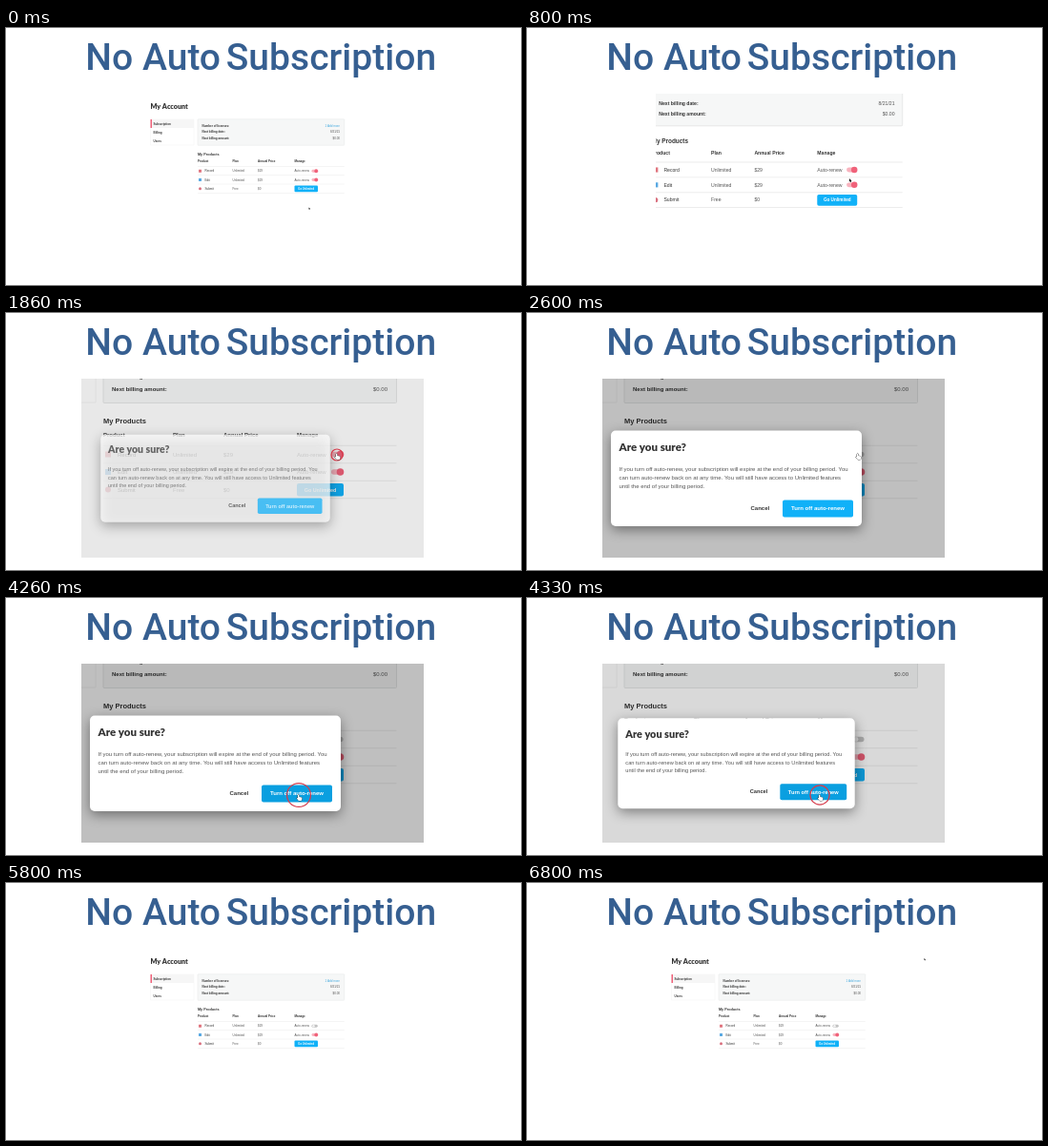
An HTML page with a canvas for the animation above (6860 ms loop, 540 px wide and 270 px high).

```html
<!DOCTYPE html>
<html lang="en">
<head>
<meta charset="utf-8">
<title>No Auto Subscription</title>
<style>
html, body { margin: 0; width: 540px; height: 270px; overflow: hidden; background: #fff; }
canvas { display: block; }
</style>
</head>
<body>
<canvas width="540" height="270"></canvas>
<script>
const LOOP = 6860;
const ctx = document.querySelector('canvas').getContext('2d');
const SANS = '"Liberation Sans", Arial, sans-serif';
const BLUE = '#10b1f8', PINK = '#f0627a', DARK = '#333', GRAY = '#555';
const ZOOM_X = 300, ZOOM_Y = 152;
const TITLE = [['No', 83.3], ['Auto', 143], ['Subscription', 230.8]];

// time, x, y of the pointer tip, in page units (the page at full zoom)
const PATH = [
  [0, 335, 225], [200, 335, 225], [1000, 346, 147], [2900, 346, 147],
  [3450, 306, 206], [4440, 306, 206], [5900, 376, 204], [6600, 508, 60], [6790, 533, 6]
];
const CLICKS = [[1640, 347, 149], [4230, 307, 207]];

const ramp = (t, a, b) => Math.min(1, Math.max(0, (t - a) / (b - a)));
const smooth = (t, a, b) => { const u = ramp(t, a, b); return u * u * (3 - 2 * u); };

function text(str, x, y, { size = 6, weight = 400, color = GRAY, align = 'left', font = SANS } = {}) {
  ctx.font = `${weight} ${size}px ${font}`;
  ctx.fillStyle = color;
  ctx.textAlign = align;
  ctx.fillText(str, x, y);
}
const bold = (str, x, y, opts) => text(str, x, y, { weight: 700, color: DARK, ...opts });

function box(x, y, w, h, fill, r = 0, stroke) {
  ctx.beginPath();
  ctx.roundRect(x, y, w, h, r);
  ctx.fillStyle = fill;
  ctx.fill();
  if (stroke) {
    ctx.strokeStyle = stroke;
    ctx.lineWidth = 1;
    ctx.stroke();
  }
}

function disc(x, y, r, fill) {
  ctx.beginPath();
  ctx.arc(x, y, r, 0, 7);
  ctx.fillStyle = fill;
  ctx.fill();
}

function toggle(y, on) {
  box(341, y - 2.8, 12.5, 5.6, on ? '#f8b3be' : '#c2c2c2', 2.8);
  disc(on ? 350.5 : 345, y, on ? 3.8 : 2.4, on ? PINK : '#f6f6f6');
}

function sidebar() {
  box(3, 40, 91, 54, '#fff', 0, '#f2f2f2');
  box(3, 40, 91, 18, '#f6f6f6');
  box(3, 40, 3, 18, PINK);
  ['Subscription', 'Billing', 'Users'].forEach((s, i) => bold(s, 9, 51 + 18 * i));
}

function summary() {
  box(102, 39.5, 307.5, 55, '#f6f7f7', 1, '#e4e6e6');
  const rows = [['Number of licenses:', '1 Add more'], ['Next billing date:', '8/21/21'], ['Next billing amount:', '$0.00']];
  rows.forEach(([label, value], i) => {
    const y = 55.4 + 13.4 * i;
    bold(label, 111, y);
    text(value, 400, y, { align: 'right', color: i ? GRAY : '#3ba6dd' });
  });
}

function products(t) {
  bold('My Products', 102, 116, { size: 7.5 });
  const cols = [102, 175, 228, 305];
  ['Product', 'Plan', 'Annual Price', 'Manage'].forEach((s, i) => bold(s, cols[i], 130.2));
  for (let i = 0; i < 4; i++) box(102, 138.7 + 18.5 * i, 307.5, 1, '#ececec');

  const rows = [['Record', 'Unlimited', '$29'], ['Edit', 'Unlimited', '$29'], ['Submit', 'Free', '$0']];
  rows.forEach(([name, plan, price], i) => {
    const y = 148.5 + 18.5 * i;
    if (i < 2) box(104, y - 3, 6, 6, i ? '#5aa9e2' : '#e0757f');
    else disc(107, y, 3, '#d9707f');
    text(name, 117, y + 2, { color: DARK });
    text(plan, cols[1], y + 2);
    text(price, cols[2], y + 2);
    if (i < 2) {
      text('Auto-renew', cols[3], y + 2);
      toggle(y, i === 1 || t < 2000);
    }
  });
  box(305, 179, 49, 13.5, BLUE, 2);
  bold('Go Unlimited', 329.5, 187.6, { size: 5.4, color: '#fff', align: 'center' });
}

function dialog(t, m) {
  box(79, 69, 359, 188, `rgba(0,0,0,${0.25 * m})`);
  const k = 0.865 + 0.135 * m;
  ctx.save();
  ctx.translate(219.5, 173.5);
  ctx.scale(k, k);
  ctx.translate(-219.5, -173.5);
  ctx.globalAlpha = Math.min(1, 2 * m);
  ctx.shadowColor = 'rgba(0,0,0,.42)';
  ctx.shadowBlur = 13;
  ctx.shadowOffsetY = 4;
  box(88, 123.5, 263, 100.5, '#fff', 5);
  ctx.shadowColor = 'transparent';
  bold('Are you sure?', 96.5, 145, { size: 11.5, weight: 900, font: 'Lato, sans-serif' });
  [
    'If you turn off auto-renew, your subscription will expire at the end of your billing period. You',
    'can turn auto-renew back on at any time. You will still have access to Unlimited features',
    'until the end of your billing period.'
  ].forEach((line, i) => text(line, 96.5, 165.6 + 9.2 * i));
  bold('Cancel', 234.5, 207.2);
  box(268, 196.5, 74, 18, t > 3330 && t < 4400 ? '#0a9fe0' : BLUE, 2);
  bold('Turn off auto-renew', 305, 207.4, { color: '#fff', align: 'center' });
  ctx.restore();
}

function rings(t) {
  for (const [start, x, y] of CLICKS) {
    const age = t - start;
    if (age < 0 || age > 260) continue;
    ctx.beginPath();
    ctx.arc(x, y, 13.5 - 0.034 * age, 0, 7);
    ctx.strokeStyle = '#d63c4c';
    ctx.lineWidth = 1.2;
    ctx.stroke();
  }
}

function pointer(t) {
  if (t > 4440 && t < 5900) return;
  let i = PATH.length - 1;
  while (PATH[i][0] > t) i--;
  const a = PATH[i], b = PATH[i + 1] || a;
  const u = a === b ? 0 : smooth(t, a[0], b[0]);
  const hand = (t > 950 && t < 3000) || (t > 3330 && t < 4440);
  ctx.save();
  ctx.translate(a[1] + (b[1] - a[1]) * u, a[2] + (b[2] - a[2]) * u);
  if (!hand) ctx.scale(0.8, 0.8);
  const shape = new Path2D(hand
    ? 'M0 1Q.8 0 1.4 1V3L4 3.6Q4.6 4 4.3 5.5L3.6 7H.8L-1.2 4.4Q-1 3.5 0 4.2Z'
    : 'M0 0V5.4L1.3 4.3L2.2 6.2L3.1 5.8L2.3 4H4Z');
  ctx.lineWidth = hand ? 0.8 : 0.7;
  ctx.strokeStyle = hand ? '#333' : '#fff';
  ctx.fillStyle = hand ? '#fff' : '#111';
  ctx.stroke(shape);
  ctx.fill(shape);
  ctx.restore();
}

function draw(t) {
  ctx.fillStyle = '#fff';
  ctx.fillRect(0, 0, 540, 270);
  for (const [word, x] of TITLE) {
    text(word, x, 44, { size: 39, weight: 500, color: '#365f91', font: 'Roboto, sans-serif' });
  }

  const k = 0.5 + 0.5 * (smooth(t, 530, 950) - smooth(t, 4440, 4780));
  const left = t < 1500 ? 135 : t > 4440 && t < 4790 ? 102 : 79;
  ctx.save();
  ctx.beginPath();
  ctx.rect(left, 69, 438 - left, 188);
  ctx.clip();
  ctx.translate(ZOOM_X, ZOOM_Y);
  ctx.scale(k, k);
  ctx.translate(-ZOOM_X, -ZOOM_Y);

  bold('My Account', 3, 17.5, { size: 14.4, weight: 900, font: 'Lato, sans-serif' });
  sidebar();
  summary();
  products(t);
  const m = ramp(t, 1740, 2070) - ramp(t, 4290, 4390);
  if (m > 0) dialog(t, m);
  rings(t);
  pointer(t);
  ctx.restore();
}

function tick() {
  draw(performance.now() % LOOP);
  requestAnimationFrame(tick);
}
tick();
</script>
</body>
</html>
```
